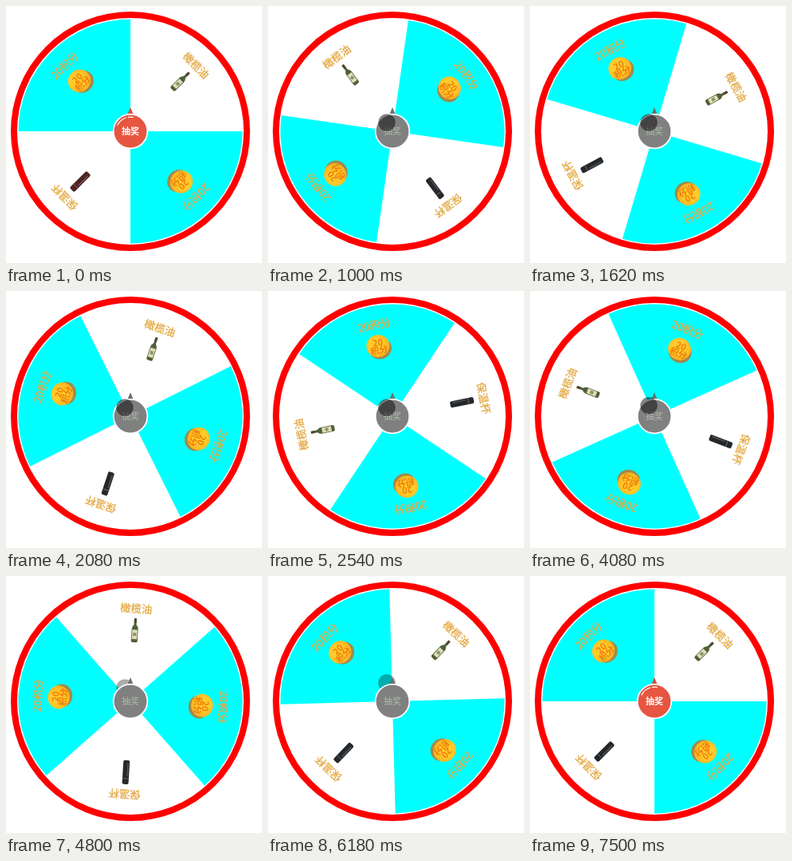
An HTML page that plays this animation: 321x322 px, repeating every 8510 ms.

```html
<!DOCTYPE html>
<html lang="zh">
<head>
<meta charset="utf-8">
<title>抽奖</title>
<style>
html, body { margin: 0; width: 100%; height: 100%; overflow: hidden; background: #fff; }
svg { display: block; width: 100%; height: 100%; }
text { font-family: "Noto Sans CJK SC", "Noto Sans CJK", "Noto Sans", sans-serif; text-anchor: middle; }
.label { font-size: 13.3px; fill: #e3a842; stroke: #e3a842; stroke-width: .3; }
.coin text { font-size: 11px; font-weight: 900; fill: #ef7d0c; }
</style>
</head>
<body>
<svg viewBox="0 0 321 322">
  <defs>
    <radialGradient id="gold" cx=".42" cy=".4" r=".6">
      <stop offset=".45" stop-color="#ffcb2b"/>
      <stop offset="1" stop-color="#f8b322"/>
    </radialGradient>
    <g id="coin" class="coin">
      <ellipse cx="1.5" cy="2.5" rx="14.5" ry="13.5" fill="#a08a4c"/>
      <ellipse cx="-.5" cy="-1" rx="14.5" ry="13.8" fill="url(#gold)"/>
      <text y="-1">20</text>
      <text y="8.5">积分</text>
    </g>
    <g id="bottle">
      <path d="M-1.5-15h3v8q2.5 2.5 2.5 5v15q0 2-2 2h-4q-2 0-2-2v-15q0-2.5 2.5-5z" fill="#4d6136"/>
      <path d="M-1.5-15h3v5h-3z" fill="#594234"/>
      <path d="M-3.2-1h6.4v12h-6.4z" fill="#e2dcba"/>
      <path d="M-2 3h4v4h-4z" fill="#8a9462"/>
    </g>
    <g id="flask">
      <rect x="-4" y="-15" width="8" height="30" rx="2"/>
      <path d="M-4-8h8" stroke="#777" stroke-width=".8"/>
      <path d="M-2-5v17" stroke="#fff" stroke-opacity=".2" stroke-width="1.5"/>
    </g>
  </defs>

  <g transform="translate(156 157)">
    <circle r="146" fill="#fff" stroke="#f00" stroke-width="8"/>
    <g id="wheel">
      <path d="M0 0V-140.5A140.5 140.5 0 0 0-140.5 0ZM0 0V140.5A140.5 140.5 0 0 0 140.5 0Z" fill="#0ff"/>
      <g id="prizes"></g>
    </g>
  </g>

  <g id="layers">
    <g id="button" transform="translate(156 157)">
      <path id="pointer" d="M0-30L4.5-19H-4.5Z"/>
      <circle id="face" r="21.3" stroke="#fff" stroke-width="1.8"/>
      <path id="gloss" d="M-16-8A18 18 0 0 1 4-17.5" fill="none" stroke="#fff"
            stroke-width="1.3" stroke-linecap="round" stroke-dasharray="14 3 6 3"/>
      <text id="word" y="4" font-size="11">抽奖</text>
    </g>
    <circle id="touch" r="10.5" stroke="#000" stroke-opacity=".2"/>
  </g>
</svg>
<script>
const LOOP = 8510, STEP = 77.3, LEAD = 14.9;
const SPIN = 10, SLIP = 57, STOP = 91, GONE = 97, TURN = 1800;
const $ = id => document.getElementById(id);

// Step and degrees left to turn; the fourth root falls evenly between them
const spin = [[9, TURN], [21, 1063.4], [33, 506.3], [45, 204.5], [62, 41.4], [80, 1.5], [STOP, 0]];

$("prizes").innerHTML = ["橄榄油", "20积分", "保温杯", "20积分"].map((name, i) =>
  `<g transform="rotate(${45 + 90 * i})">
    <text class="label" y="-111.5">${name}</text>
    <use href="#${i % 2 ? "coin" : i ? "flask" : "bottle"}" y="-89"/>
  </g>`).join("");

const mix = (a, b, p) => a + (b - a) * Math.min(1, Math.max(0, p));
const set = (id, name, value) => $(id).setAttribute(name, value);

function angleLeft(k) {
  const i = spin.findIndex(([step]) => step > k);
  if (i < 1) return i ? 0 : TURN;
  const [k0, a0] = spin[i - 1], [k1, a1] = spin[i];
  return mix(a0 ** .25, a1 ** .25, (k - k0) / (k1 - k0)) ** 4;
}

// The touch dot comes in, drifts upward, then leaves
function touchAt(k) {
  const enter = (k - 1) / 7, drift = (k - 45) / 35, leave = (k - 90) / 6;
  return [
    mix(mix(218, 149, enter), 258, leave),
    mix(mix(272, mix(146, 134, drift), enter), 290, leave)
  ];
}

function draw(time) {
  const k = Math.floor((time % LOOP + LEAD) / STEP);
  set("wheel", "transform", `rotate(${TURN - angleLeft(k)})`);

  const busy = k >= SPIN && k < STOP;
  set("pointer", "fill", busy ? "#66706a" : "#dc4b38");
  set("face", "fill", busy ? "#808080" : "#e65641");
  set("word", "fill", busy ? "#a9bda5" : "#fff");
  set("word", "font-weight", busy ? 400 : 700);
  set("gloss", "visibility", busy ? "hidden" : "visible");
  set("flask", "fill", k < SPIN ? "#4f2423" : "#25282b");

  // Late in the spin the dot fades and slips behind the button
  const behind = busy && k >= SLIP;
  const front = $(behind ? "button" : "touch");
  if ($("layers").lastElementChild !== front) $("layers").append(front);
  const [x, y] = touchAt(k);
  set("touch", "cx", x);
  set("touch", "cy", y);
  set("touch", "fill-opacity", behind ? .32 : .48);
  set("touch", "visibility", k > 0 && k < GONE ? "visible" : "hidden");
}

let start;
function tick(now) {
  start ??= now;
  draw(now - start);
  requestAnimationFrame(tick);
}
draw(0);
requestAnimationFrame(tick);
</script>
</body>
</html>
```
